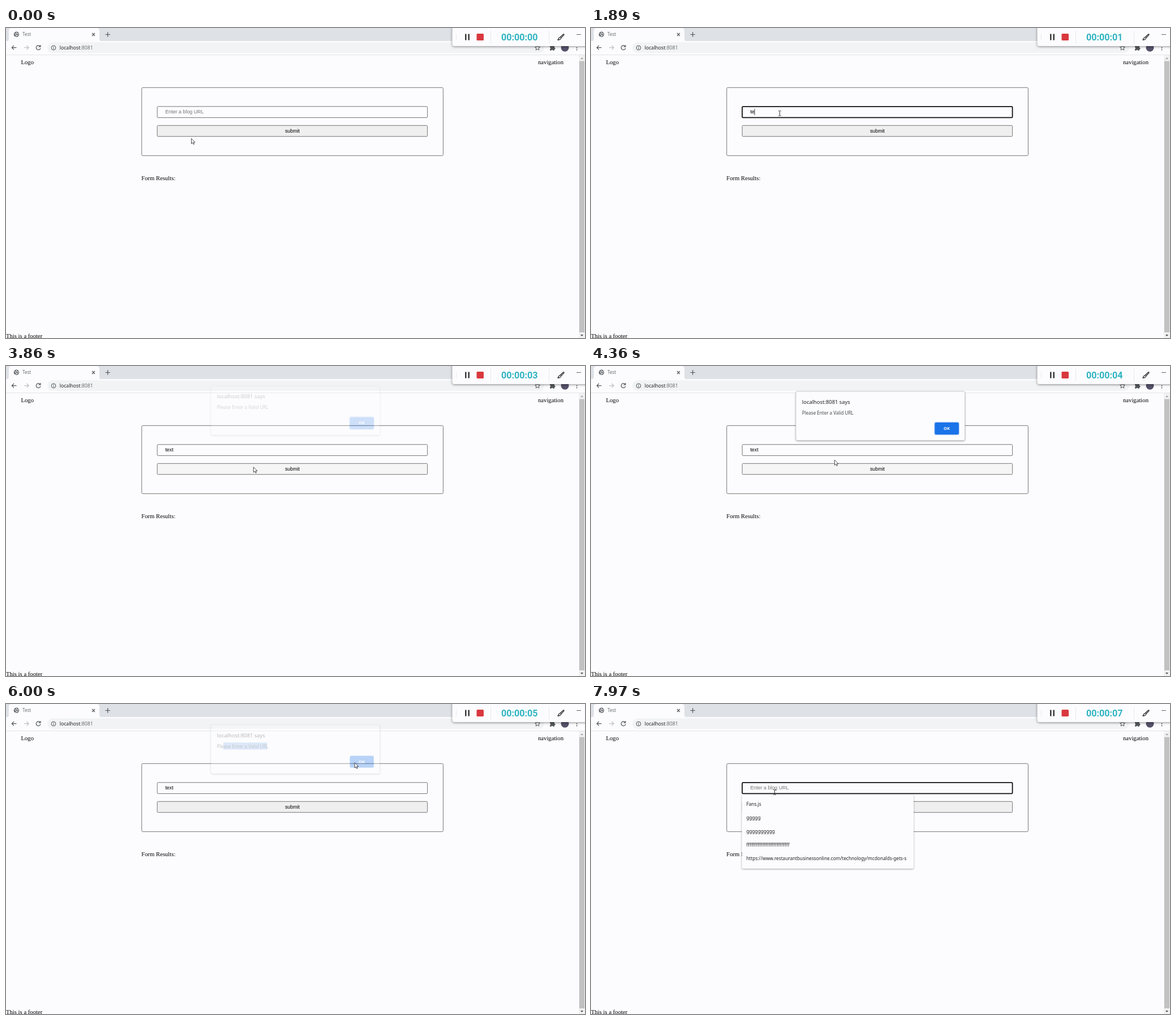
These frames come from a looping animation (1023 by 548 pixels, 8 s). An HTML page:

```html
<!DOCTYPE html>
<html lang="en">
<head>
<meta charset="utf-8">
<title>Form demo</title>
<style>
  html, body { margin: 0; width: 100%; height: 100%; overflow: hidden; background: #fcfcfe; }
  svg { display: block; }
  text { white-space: pre; }
  .serif { font: 10.67px "Liberation Serif", serif; fill: #000; }
  .field { font: 8.89px "Liberation Sans", sans-serif; fill: #000; }
  .ui { font: 8px "Noto Sans", sans-serif; fill: #202124; }
  .line { fill: none; stroke: #50555a; stroke-width: 1.2; }
  .box { fill: #fcfcfe; stroke: #767676; stroke-width: 1; }
  .float { filter: drop-shadow(0 1px 1.5px rgba(0, 0, 0, .35)); }
</style>
</head>
<body>
<svg width="1023" height="548" viewBox="0 0 1023 548">
  <rect width="1023" height="548" fill="#fcfcfe"/>

  <!-- page -->
  <text class="serif" x="26.5" y="63.5">Logo</text>
  <text class="serif" x="940" y="63.5">navigation</text>
  <rect class="box" x="239.8" y="105.3" width="532.6" height="120.4" rx="2"/>
  <rect id="input" class="box" x="267.2" y="138.8" width="477.4" height="19.6" rx="1.5"/>
  <text id="value" class="field" x="281.4" y="151.3"></text>
  <rect id="caret" y="143" width=".8" height="11"/>
  <rect id="button" class="box" x="267.2" y="172.3" width="477.4" height="19.4" rx="1.5"/>
  <text class="field" x="506" y="185" text-anchor="middle">submit</text>
  <text class="serif" x="239.3" y="268.7">Form Results:</text>
  <text class="serif" x="0" y="548">This is a footer</text>
  <rect x="1012" y="48" width="11" height="500" fill="#f1f1f1"/>
  <rect x="1013" y="58.5" width="9" height="479.5" fill="#c1c1c1"/>
  <path d="M1015 55l2.5-3 2.5 3z" fill="#a3a3a3"/>
  <path d="M1015 542l2.5 3 2.5-3z" fill="#505050"/>

  <g id="list" class="ui" font-weight="500">
    <rect class="float" x="266.5" y="160" width="303.5" height="131" rx="2" fill="#fcfcfe"/>
    <clipPath id="listClip"><rect x="270" y="160" width="292.5" height="131"/></clipPath>
    <g id="rows" clip-path="url(#listClip)"></g>
  </g>

  <!-- browser frame -->
  <rect width="1023" height="24" fill="#dee1e6"/>
  <path d="M0 24q5 0 5-5V5q0-5 5-5h150q5 0 5 5v14q0 5 5 5z" fill="#fcfcfe"/>
  <rect y="23" width="1023" height="24" fill="#fcfcfe"/>
  <rect y="47" width="1023" height="1" fill="#e3e5e8"/>
  <circle cx="18.5" cy="11.3" r="4.7" fill="#5f6368"/>
  <path d="M15 10q2 0 3 2t-1 3M18 7.5q0 2 2 2t2 1.500M20 14q0-2 2-2" fill="none" stroke="#fcfcfe" stroke-width="1.2"/>
  <text class="ui" x="29" y="14" style="fill:#6a6e72">Test</text>
  <path class="line" d="M152 9l5 5M157 9l-5 5M175.500 11.500h8.500M179.750 7.250v8.500"/>
  <path class="line" d="M18.500 34.700h-8M14 31l-3.700 3.700L14 38.400"/>
  <path class="line" style="stroke:#bdc0c4" d="M32 34.700h8M36.500 31l3.700 3.700-3.700 3.700"/>
  <path class="line" d="M60 32a3.900 3.900 0 1 0 1 3.600M61 30v3.200h-3.200"/>
  <rect x="73" y="25.5" width="878" height="18.5" rx="9.25" fill="#f1f3f4"/>
  <circle class="line" cx="84" cy="35" r="3.900" style="stroke-width:1"/>
  <path class="line" d="M84 34.300v3M84 32.300v1.200" style="stroke-width:1"/>
  <text class="ui" x="94.700" y="38" style="font-size:8.7px">localhost<tspan fill="#6a6e72">:8081</tspan></text>
  <path class="line" style="stroke-width:1" d="M939 30.500l1.300 3 3.200.3-2.400 2.100.7 3.100-2.800-1.700-2.800 1.700.7-3.100-2.400-2.100 3.200-.3z"/>
  <path d="M961 32h2.500a1.700 1.700 0 0 1 3.400 0h2.100v2.500a1.600 1.600 0 0 1 0 3.200v2h-2.500a1.600 1.600 0 0 0-3 0H961v-2.500a1.600 1.600 0 0 0 0-3z" fill="#55595d"/>
  <circle cx="987.500" cy="34.800" r="7" fill="#55516a"/>
  <g fill="#50555a"><circle cx="1008.500" cy="35" r="1"/><circle cx="1008.500" cy="38.500" r="1"/></g>

  <!-- alert -->
  <g id="alert" class="ui">
    <rect class="float" x="362" y="45" width="298.500" height="86.500" rx="3" fill="#fcfcfe" stroke="#c4c6c8" stroke-width=".7"/>
    <text x="372.800" y="67" style="font-size:9.4px">localhost:8081 says</text>
    <rect id="mark" x="384" y="76.500" height="12.500" fill="#94bdf3"/>
    <text x="372.800" y="86" style="font-size:8.05px;fill:#45494d">Please Enter a Valid URL</text>
    <rect id="ring" x="606.300" y="98.800" width="44.500" height="23.400" rx="3.500" fill="#a3c7f6"/>
    <rect x="607.500" y="100" width="42.300" height="21" rx="2.500" fill="#1a73e8"/>
    <text x="628.500" y="113" text-anchor="middle" style="font-weight:700;font-size:7.500px;fill:#fff">OK</text>
  </g>

  <!-- recorder -->
  <rect x="788.500" y="-6" width="242" height="38" rx="4" fill="#fcfcfe" style="filter:drop-shadow(0 1px 2px rgba(0,0,0,.45))"/>
  <path d="M795.500 11v10M856.500 5v22M959.500 5v22" stroke="#e6e8ea"/>
  <path d="M812.300 10.500v11M817.700 10.500v11" stroke="#222" stroke-width="2.200"/>
  <rect x="831.500" y="10" width="12.500" height="12" rx="1.500" fill="#d8383e"/>
  <text id="clock" x="875" y="21.800" style="font:700 16.100px Roboto,sans-serif" fill="#2fb3c1"></text>
  <g fill="none" stroke="#222" stroke-width="1.200">
    <path d="M979.500 16l5-5q1.500-.8 1.500 1l-5 5.500zM979.500 16l-2.500 1.500q-1 3-2.500 3.500 4.500.5 6.500-3.500"/>
  </g>
  <path d="M1008 11.500h8" stroke="#666"/>

  <path id="arrow" d="M0 0v9.300l2.200-2 1.500 3.200 1.500-.7-1.500-3.100h3z" fill="#fff" stroke="#222" stroke-width=".8"/>
  <path id="beam" d="M-2.300-4.500q2.300 0 2.300 1 0-1 2.300-1M0-3.500v7M-2.300 4.500q2.300 0 2.300-1 0 1 2.300 1" fill="none" stroke="#222" stroke-width=".9"/>
</svg>
<script>
const LOOP = 8000, BLINK = 530;
const $ = id => document.getElementById(id);
const clamp = (v, lo, hi) => Math.min(hi, Math.max(lo, v));
const show = (id, on) => $(id).setAttribute('visibility', on ? 'visible' : 'hidden');
const set = (id, attrs) => { for (const k in attrs) $(id).setAttribute(k, attrs[k]); };
const count = (times, t) => times.filter(s => s <= t).length;

// pointer stops: time, x, y
const path = [
  [0, 327.5, 195.3], [130, 327.5, 195.3], [560, 333.5, 150.8], [2900, 333.5, 150.8],
  [3230, 361, 151], [3690, 437.3, 178.7], [4280, 437.3, 178.7], [4640, 384, 81],
  [4700, 384, 81], [5060, 461.5, 80.5], [5170, 461.5, 80.5], [5780, 616, 103.7],
  [6040, 616, 103.7], [6600, 325.5, 147.8], [7969, 325.5, 147.8], [7970, 324.5, 156], [8000, 324.5, 156]
];
const seconds = [1550, 2100, 3050, 4050, 5050, 6100, 7140];
const typed = [1600, 1850, 2100, 2365];
const erased = [7150, 7200, 7250, 7300];
const caretResets = [600, ...typed, 6620, ...erased];

const items = ['Fans.js', 'g'.repeat(5), 'g'.repeat(10), 'f'.repeat(27),
  'https://www.restaurantbusinessonline.com/technology/mcdonalds-gets-s'];
$('rows').innerHTML = items.map((s, i) =>
  `<text x="274.500" y="${179.6 + i * 24}" style="font-size:8.2px">${s}</text>`).join('');

function pointer(t) {
  const i = path.findIndex(p => p[0] > t);
  const [t0, x0, y0] = path[i - 1], [t1, x1, y1] = path[i];
  const u = (t - t0) / (t1 - t0), e = u * u * (3 - 2 * u);
  return [x0 + (x1 - x0) * e, y0 + (y1 - y0) * e];
}

function draw(t) {
  const [x, y] = pointer(t);
  const within = (l, top, r, b) => x > l && x < r && y > top && y < b;

  const focus = t >= 600 && t < 3690 || t >= 6620;
  const listOpen = t >= 750 && t < 1600 || t >= 7350;
  const text = 'text'.slice(0, count(typed, t) - count(erased, t));
  $('value').textContent = text || 'Enter a blog URL';
  $('value').style.fill = text ? '#000' : '#757575';
  set('input', { style: focus ? 'stroke:#101010;stroke-width:1.8' : '' });
  const last = caretResets[count(caretResets, t) - 1];
  show('caret', focus && Math.floor((t - last) / BLINK) % 2 === 0);
  set('caret', { x: 281.2 + (text ? $('value').getComputedTextLength() : 0) });
  show('list', listOpen);

  const pressed = t >= 3690 && t < 5920;
  const hover = !listOpen && within(267, 172, 745, 192);
  set('button', { style: 'fill:' + (pressed ? '#f5f5f5' : hover ? '#e5e5e5' : '#efefef') });

  const alpha = clamp(Math.min((t - 3820) / 200, (6060 - t) / 200), 0, 1);
  set('alert', { opacity: alpha, transform: `translate(0 ${-12 * (1 - alpha)})` });
  set('mark', { width: t > 4700 ? clamp(x, 384, 461.5) - 384 : 0 });
  show('ring', t < 4700);

  $('clock').textContent = '00:00:0' + count(seconds, t);

  const beam = within(267, 139, 745, 159) || alpha === 1 && within(372, 76, 465, 90);
  show('beam', beam);
  show('arrow', !beam);
  set(beam ? 'beam' : 'arrow', { transform: `translate(${x} ${y})` });
}

const start = performance.now();
function tick(now) {
  draw(Math.max(0, now - start) % LOOP);
  requestAnimationFrame(tick);
}
draw(0);
requestAnimationFrame(tick);
</script>
</body>
</html>
```
